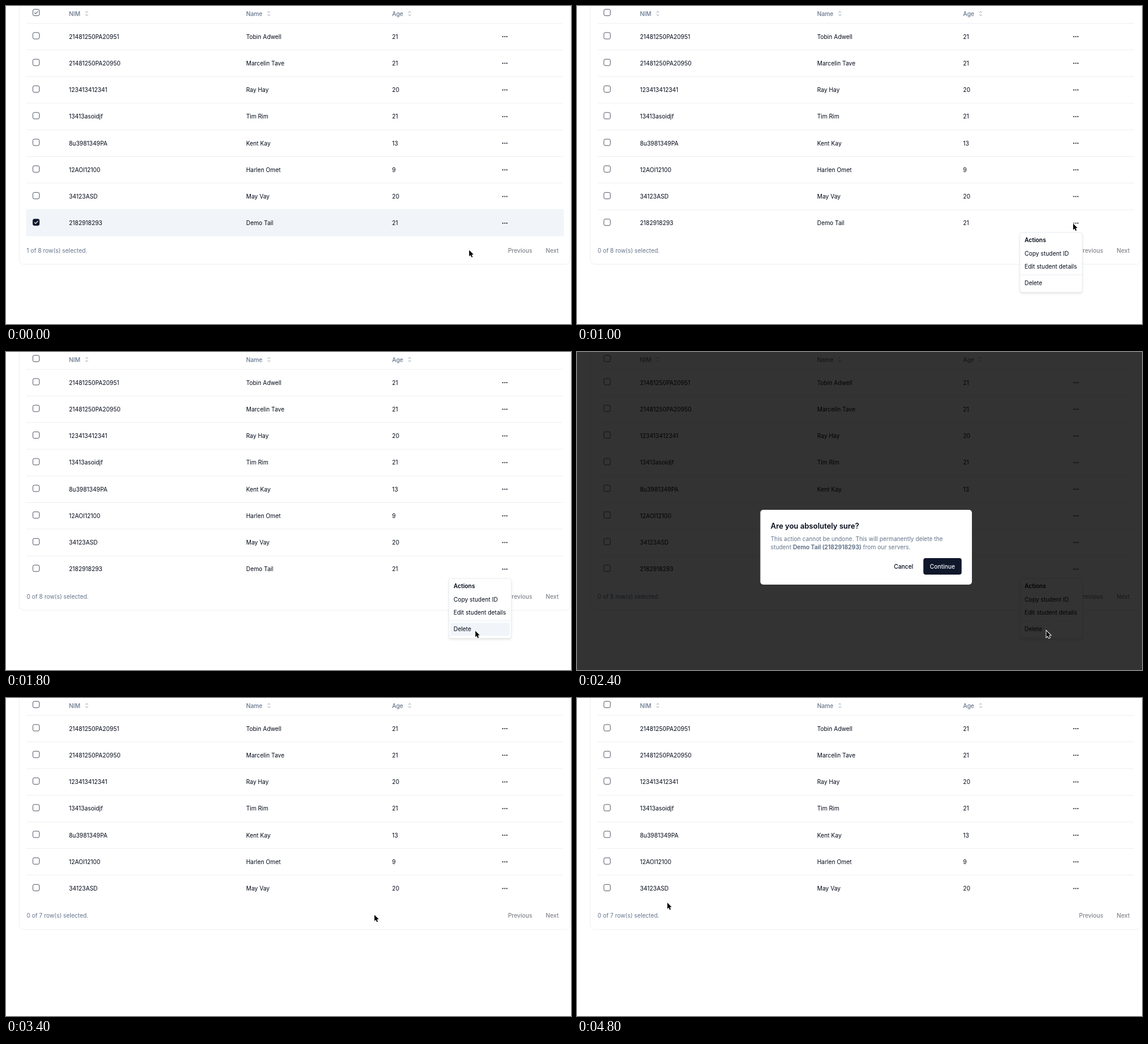
An HTML page with a canvas that plays this animation: 960 by 540 pixels, repeating every 5000 ms.

```html
<!DOCTYPE html>
<html lang="en">
<head>
<meta charset="utf-8">
<title>Student table</title>
<style>
html, body { margin: 0; width: 100%; height: 100%; overflow: hidden; background: #fff; }
canvas { display: block; }
</style>
</head>
<body>
<canvas id="stage" width="960" height="540"></canvas>
<script>
const ctx = document.getElementById('stage').getContext('2d');
const LOOP = 5000, STEP = 200;
const ROW = 45.25, TOP = 29;
const INK = '#020817', PRIMARY = '#0f172a', MUTED = '#64748b', DIM = '#80838b';
const LINE = '#e2e8f0', TINT = '#f1f5f9';
const FAMILY = 'Inter, "Liberation Sans", sans-serif';

const students = [
  ['21481250PA20951', 'Tobin Adwell', 21],
  ['21481250PA20950', 'Marcelin Tave', 21],
  ['123413412341', 'Ray Hay', 20],
  ['13413asoidjf', 'Tim Rim', 21],
  ['8u3981349PA', 'Kent Kay', 13],
  ['12AOI12100', 'Harlen Omet', 9],
  ['34123ASD', 'May Vay', 20],
  ['2182918293', 'Demo Tail', 21]
];
const columns = { NIM: 107, Name: 408, Age: 656 };
const menuItems = { 'Copy student ID': 420, 'Edit student details': 442, Delete: 470.5 };

// Pointer rests: [time, x, y]
const rests = [
  [0, 787, 414.5], [600, 869, 385], [1000, 843, 369.5], [1600, 797.5, 473.5],
  [2800, 797.5, 473.5], [3200, 626, 368.5], [4000, 626, 368],
  [4200, 627, 354], [4800, 153.5, 347.5]
];

function pointer(t) {
  const i = rests.findLastIndex(r => r[0] <= t);
  const [t0, x0, y0] = rests[i];
  const [t1, x1, y1] = rests[i + 1] || [LOOP, x0, y0];
  const k = 1 - (1 - (t - t0) / (t1 - t0)) ** 3;
  return [x0 + (x1 - x0) * k, y0 + (y1 - y0) * k];
}

function text(str, x, mid, { color = INK, weight = 400, size = 9.88 } = {}) {
  ctx.font = `${weight} ${size}px ${FAMILY}`;
  ctx.fillStyle = color;
  ctx.fillText(str, x, mid + size * 0.363);
  return x + ctx.measureText(str).width;
}

function box(x, y, w, h, r, fill, stroke, width = 0.7) {
  ctx.beginPath();
  ctx.roundRect(x, y, w, h, r);
  if (fill) { ctx.fillStyle = fill; ctx.fill(); }
  if (stroke) { ctx.strokeStyle = stroke; ctx.lineWidth = width; ctx.stroke(); }
}

function path(points, x = 0, y = 0) {
  ctx.beginPath();
  for (let i = 0; i < points.length; i += 2) ctx.lineTo(x + points[i], y + points[i + 1]);
}

function rule(x1, x2, y) {
  ctx.fillStyle = LINE;
  ctx.fillRect(x1, y, x2 - x1, 0.7);
}

function checkbox(y, fill, tick) {
  box(45.7, y - 5.4, 10.9, 10.9, 2.4, fill, PRIMARY);
  if (!tick) return;
  path([-3, 0.2, -1, 2.2, 3.2, -2.2], 51.2, y);
  ctx.strokeStyle = tick;
  ctx.lineWidth = 1.2;
  ctx.stroke();
}

function heading(label, x) {
  const iconX = text(label, x, 13, { color: MUTED, weight: 500 }) + 11;
  ctx.strokeStyle = MUTED;
  ctx.lineWidth = 0.8;
  for (const s of [-1, 1]) {
    path([-2, s * 1.5, 0, s * 3.5, 2, s * 1.5], iconX, 12.8);
    ctx.stroke();
  }
}

function table(count, selected, hovered) {
  const end = TOP + count * ROW;
  box(22.5, -20, 936, end + 67.5, 8, null, LINE);
  if (selected || hovered) {
    ctx.fillStyle = selected ? TINT : '#f8fafc';
    ctx.fillRect(34, end - ROW, 914, ROW);
  }
  checkbox(11, null, selected && MUTED);
  for (const label in columns) heading(label, columns[label]);

  const xs = Object.values(columns);
  students.slice(0, count).forEach((student, i) => {
    const mid = 52 + i * ROW;
    rule(35, 946, TOP + i * ROW);
    const on = selected && i === count - 1;
    checkbox(50.5 + i * ROW, on && PRIMARY, on && '#fff');
    student.forEach((value, c) => text(value, xs[c], mid));
    ctx.fillStyle = INK;
    for (const dx of [-3.4, 0, 3.4]) {
      ctx.beginPath();
      ctx.arc(847.6 + dx, mid, 1, 0, 7);
      ctx.fill();
    }
  });

  const foot = end + 24;
  text(`${selected ? 1 : 0} of ${count} row(s) selected.`, 35, foot, { color: MUTED });
  text('Previous', 853, foot, { color: DIM, weight: 500 });
  text('Next', 917, foot, { color: DIM, weight: 500 });
}

function menu(y) {
  ctx.save();
  ctx.shadowColor = 'rgba(0,0,0,.12)';
  ctx.shadowBlur = 4;
  ctx.shadowOffsetY = 2;
  box(752.5, 384.5, 106, 101.5, 4, '#fff');
  ctx.restore();
  box(752.5, 384.5, 106, 101.5, 4, null, LINE);
  rule(753, 858, 456);
  text('Actions', 760.5, 397, { weight: 600 });
  for (const label in menuItems) {
    const mid = menuItems[label];
    if (Math.abs(y - mid) < 11) box(755, mid - 11, 101, 22.5, 2, TINT);
    text(label, 760.5, mid);
  }
}

function dialog(lit) {
  ctx.fillStyle = 'rgba(0,0,0,.8)';
  ctx.fillRect(0, 0, 960, 540);
  box(311.5, 268, 359.5, 127, 5, '#fff');
  text('Are you absolutely sure?', 329, 295, { weight: 600, size: 12.6 });
  const soft = { color: MUTED };
  const [nim, name] = students.at(-1);
  text('This action cannot be undone. This will permanently delete the', 329, 317.8, soft);
  let x = text('student ', 329, 331.8, soft);
  x = text(`${name} (${nim})`, x, 331.8, { color: MUTED, weight: 700 });
  text(' from our servers.', x, 331.8, soft);
  text('Cancel', 538.5, 364, { weight: 500 });
  box(588.5, 350, 65, 28, 4, lit ? '#272e3f' : PRIMARY);
  text('Continue', 599.5, 364, { color: '#f8fafc', weight: 500 });
}

function arrow(x, y) {
  path([0, 0, 0, 10.6, 2.4, 8.4, 4.1, 12.3, 5.9, 11.5, 4.2, 7.7, 7.3, 7.4], x, y);
  ctx.closePath();
  ctx.strokeStyle = '#fff';
  ctx.lineWidth = 1.8;
  ctx.stroke();
  ctx.fillStyle = '#000';
  ctx.fill();
}

function hand(x, y) {
  const shape = (fill, stroke) => {
    box(x - 1.4, y - 0.8, 2.8, 9, 1.4, fill, stroke, 1.6);
    box(x - 3, y + 4.6, 9, 8.4, 3, fill, stroke, 1.6);
  };
  shape(null, '#000');
  shape('#fff');
}

function draw(now) {
  const t = Math.floor((now % LOOP) / STEP) * STEP;
  const within = (a, b) => t >= a && t < b;
  const [x, y] = pointer(t);

  ctx.fillStyle = '#fff';
  ctx.fillRect(0, 0, 960, 540);
  table(t < 3400 ? 8 : 7, t < 200, within(600, 1000));
  if (within(1000, 3400)) menu(t < 2400 ? y : 0);
  if (within(2400, 3400)) dialog(t >= 3200);
  (within(800, 1000) || within(3000, 3400) ? hand : arrow)(x, y);
}

function loop() {
  draw(performance.now());
  requestAnimationFrame(loop);
}
loop();
</script>
</body>
</html>
```
